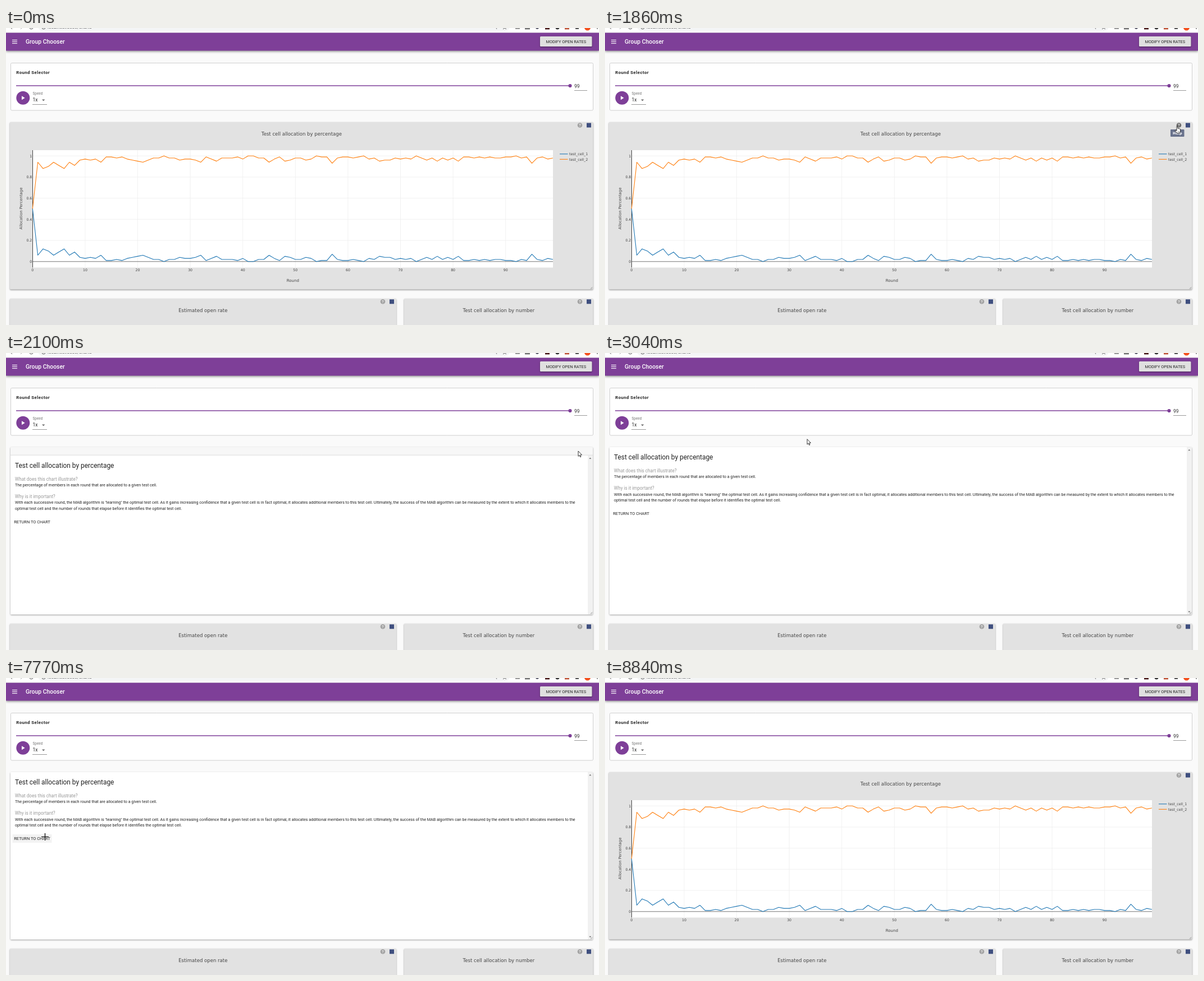
An HTML page with a canvas that plays this animation: 1056 px wide and 530 px high, repeating every 9860 ms.

```html
<!DOCTYPE html>
<html lang="en">
<head>
<meta charset="utf-8">
<title>Group Chooser</title>
<style>
html, body { margin: 0; width: 100%; height: 100%; overflow: hidden; background: #fafafa; }
canvas { display: block; }
</style>
</head>
<body>
<canvas id="stage" width="1056" height="530"></canvas>
<script>
const ctx = document.getElementById('stage').getContext('2d');
const LOOP = 9860;
const UI = 'Roboto, sans-serif';
const PLOT = '"DejaVu Sans", sans-serif';
const PURPLE = '#7e3f98';
const BLUE = '#1f77b4';
const ORANGE = '#ff7f0e';

// share of test_cell_1 per round, in percent
const share = [
  50, 6, 12, 10, 6, 9, 12, 6, 9, 4, 3, 4, 3, 6, 1, 1, 2, 1, 3, 4,
  5, 6, 4, 2, 2, 0, 2, 2, 4, 3, 3, 4, 6, 1, 3, 5, 2, 2, 2, 1,
  3, 0, 0, 2, 2, 6, 3, 1, 5, 4, 2, 2, 4, 3, 0, 1, 1, 7, 2, 1,
  1, 2, 1, 0, 3, 2, 5, 4, 4, 2, 3, 2, 3, 0, 2, 4, 2, 5, 2, 4,
  2, 5, 1, 1, 2, 1, 2, 1, 2, 2, 1, 1, 0, 2, 1, 7, 2, 1, 3, 2
];

function rect(x, y, w, h, fill) {
  ctx.fillStyle = fill;
  ctx.fillRect(x, y, w, h);
}

function text(str, x, y, size, fill, { font = UI, weight = 400, align = 'left', gap = 0 } = {}) {
  ctx.font = `${weight} ${size}px ${font}`;
  ctx.letterSpacing = gap + 'px';
  ctx.textAlign = align;
  ctx.fillStyle = fill;
  ctx.fillText(str, x, y);
}

function path(points, { fill, stroke, width = 1, close = false }) {
  ctx.beginPath();
  points.forEach(([x, y]) => ctx.lineTo(x, y));
  if (close) ctx.closePath();
  if (fill) { ctx.fillStyle = fill; ctx.fill(); }
  if (stroke) { ctx.strokeStyle = stroke; ctx.lineWidth = width; ctx.stroke(); }
}

function line(x1, y1, x2, y2, stroke, width = 1) {
  path([[x1, y1], [x2, y2]], { stroke, width });
}

function disc(x, y, r, fill) {
  ctx.beginPath();
  ctx.arc(x, y, r, 0, 7);
  ctx.fillStyle = fill;
  ctx.fill();
}

function card(x, y, w, h, fill) {
  ctx.save();
  ctx.shadowColor = 'rgba(0,0,0,.45)';
  ctx.shadowBlur = 2.5;
  ctx.shadowOffsetY = 1;
  ctx.beginPath();
  ctx.roundRect(x, y, w, h, 1.5);
  ctx.fillStyle = fill;
  ctx.fill();
  ctx.restore();
}

function browserBar() {
  rect(0, 0, 1056, 8, '#fff');
  ctx.beginPath();
  ctx.roundRect(57, -12, 840, 17, 8);
  ctx.fillStyle = '#f4f5f6';
  ctx.fill();
  text('localhost:8080/charts', 74, 1, 8, '#444');
  line(8, -1, 11, 2, '#666');
  line(29, -1, 26, 2, '#aaa');
  ctx.strokeStyle = '#666';
  ctx.lineWidth = 1;
  for (const [x, y, r] of [[45, -1, 3], [67, -1, 3]]) {
    ctx.beginPath();
    ctx.arc(x, y, r, 0, Math.PI);
    ctx.stroke();
  }
  line(873, 0, 874, 2, '#777');
  path([[885, 2], [888, 0], [891, 2]], { stroke: '#666' });
  rect(907, 0, 8, 2, '#999');
  rect(924, 0, 9, 2.5, '#777');
  disc(946, -1, 3, '#556');
  rect(960, 0, 8, 2.5, '#4a1c1c');
  disc(982, -1, 3.5, '#333');
  rect(995, 0, 8, 2.5, '#c0583c');
  rect(1014, 0, 6, 2, '#555');
  disc(1035.5, -1, 5.5, '#f4511e');
  disc(1053, 1, 0.9, '#666');
}

function appBar() {
  ctx.save();
  ctx.shadowColor = 'rgba(0,0,0,.45)';
  ctx.shadowBlur = 4;
  ctx.shadowOffsetY = 1;
  rect(0, 8.5, 1056, 32, PURPLE);
  ctx.restore();
  browserBar();
  for (const y of [21.5, 24.5, 27.5]) line(11, y, 20, y, '#fff', 1.1);
  text('Group Chooser', 35, 28, 10.4, '#fff', { weight: 500 });
  card(951, 15, 92.5, 18, '#e0e0e0');
  text('MODIFY OPEN RATES', 997.3, 26.8, 7.4, '#222', { align: 'center' });
}

function selector() {
  ctx.beginPath();
  ctx.roundRect(8.5, 62.5, 1037, 84.5, 2);
  ctx.fillStyle = '#fff';
  ctx.fill();
  ctx.strokeStyle = '#cfcfcf';
  ctx.lineWidth = 1;
  ctx.stroke();
  text('Round Selector', 18.2, 81.5, 7.8, '#222', { weight: 700, gap: 0.45 });
  line(18, 103, 1004, 103, PURPLE, 1.4);
  disc(1004.5, 103, 3.1, PURPLE);
  text('99', 1012, 106.5, 8.4, '#333');
  line(1012, 111.5, 1035, 111.5, '#999');
  disc(30.3, 124.8, 12, PURPLE);
  path([[28, 121.3], [28, 128.3], [33.6, 124.8]], { fill: '#fff', close: true });
  text('Speed', 47.5, 118.7, 6.4, '#777');
  text('1x', 47.5, 131, 8.5, '#222');
  path([[64, 127.5], [69.4, 127.5], [66.7, 130.2]], { fill: '#666', close: true });
  line(47, 136.5, 73, 136.5, '#999');
}

function icons(x, y, lit) {
  disc(x, y, 4.3, lit ? '#6e6e6e' : '#a3a3a3');
  text('?', x, y + 2.5, 7, '#eee', { weight: 700, align: 'center' });
  rect(x + 12, y - 4, 8, 8, '#3f4f7f');
}

function resizeGrip() {
  line(1041, 465.5, 1044, 462.5, '#777', 0.8);
  line(1043, 465.5, 1044, 464.5, '#777', 0.8);
}

const px = i => 47.3 + i * 9.36;
const py = v => 416.8 - v * 188.6;

function series(value, stroke) {
  path(share.map((s, i) => [px(i), py(value(s / 100))]), { stroke, width: 1.1 });
}

function chart(lit) {
  card(7, 168, 1038.5, 298.5, '#e2e2e2');
  icons(1022, 173.5, lit);
  text('Test cell allocation by percentage', 526.4, 192.3, 8.56, '#444', { font: PLOT, align: 'center' });
  rect(47, 218, 927, 209.5, '#fff');
  for (let i = 0; i < 100; i += 10) {
    if (i) line(px(i), 218, px(i), 427.5, '#eee', 0.8);
    text(i, px(i), 434, 6.2, '#444', { font: PLOT, align: 'center' });
  }
  for (let k = 0; k < 6; k++) {
    const y = py(k / 5);
    if (k) line(47, y, 974, y, '#eee', 0.8);
    text(k / 5, 46.3, y + 2.3, 6.2, '#444', { font: PLOT, align: 'right' });
  }
  line(47, py(0), 974, py(0), '#666', 0.9);
  line(47.5, 218, 47.5, 427.5, '#444');
  ctx.lineJoin = 'round';
  series(v => v, BLUE);
  series(v => 1 - v, ORANGE);
  text('Round', 510.8, 453, 7, '#444', { font: PLOT, align: 'center' });
  ctx.save();
  ctx.translate(28.5, 322);
  ctx.rotate(-Math.PI / 2);
  text('Allocation Percentage', 0, 0, 6.9, '#444', { font: PLOT, align: 'center' });
  ctx.restore();
  line(986, 224.8, 1000.5, 224.8, BLUE, 1.1);
  line(986, 234.3, 1000.5, 234.3, ORANGE, 1.1);
  text('test_cell_1', 1003, 227, 6.3, '#444', { font: PLOT });
  text('test_cell_2', 1003, 236.5, 6.3, '#444', { font: PLOT });
  resizeGrip();
}

function lowerCards() {
  const title = { font: PLOT, align: 'center' };
  card(7, 483, 688, 60, '#e2e2e2');
  icons(671, 488.3);
  text('Estimated open rate', 350.8, 507.2, 8.56, '#444', title);
  card(709, 483, 336.5, 60, '#e2e2e2');
  icons(1022, 488.3);
  text('Test cell allocation by number', 877.3, 507.2, 8.56, '#444', title);
}

function helpPanel(shift, hover) {
  card(8, 168, 1037, 298.5, shift ? '#f7f7f7' : '#fff');
  ctx.save();
  ctx.beginPath();
  ctx.rect(7, 167, 1039, 299.5);
  ctx.clip();
  ctx.translate(0, shift);
  rect(8, 168, 1028, 299, '#fff');
  rect(1036, 168, 9, 299, '#f1f1f1');
  if (shift) line(8, 167.5, 1045, 167.5, '#ddd');
  path([[1038.3, 174.2], [1042.3, 174.2], [1040.3, 171.8]], { fill: '#777', close: true });
  path([[1038.3, 460.8], [1042.3, 460.8], [1040.3, 463.2]], { fill: '#777', close: true });
  text('Test cell allocation by percentage', 16, 190.2, 11.9, '#222');
  text('What does this chart illustrate?', 16, 212.8, 8.15, '#999');
  text('The percentage of members in each round that are allocated to a given test cell.', 16, 223, 7.17, '#222');
  text('Why is it important?', 16, 244.4, 8.15, '#999');
  text('With each successive round, the MAB algorithm is "learning" the optimal test cell. As it gains increasing confidence that a given test cell is in fact optimal, it allocates additional members to this test cell. Ultimately, the success of the MAB algorithm can be measured by the extent to which it allocates members to the', 16, 254.7, 7.17, '#222');
  text('optimal test cell and the number of rounds that elapse before it identifies the optimal test cell.', 16, 264.9, 7.17, '#222');
  if (hover) rect(11.5, 279, 70, 15, '#f3f3f3');
  text('RETURN TO CHART', 14.3, 289.4, 7.4, '#222');
  ctx.restore();
  resizeGrip();
}

function tooltip() {
  ctx.beginPath();
  ctx.roundRect(1007, 181, 24.5, 13, 1);
  ctx.fillStyle = '#69728c';
  ctx.fill();
  text('Help', 1019.3, 190, 6.4, '#fff', { font: PLOT, align: 'center', weight: 700 });
}

const pointers = {
  arrow() {
    path([[0, 0], [0, 9.4], [2.1, 7.5], [3.6, 10.7], [5, 10.1], [3.6, 7], [6.4, 6.7]],
      { fill: '#fff', stroke: '#222', width: 0.9, close: true });
  },
  hand() {
    path([[-0.9, 0], [0.7, 0], [1, 4.2], [3.5, 4.6], [5.6, 5.5], [5.6, 9], [4.5, 12.6], [-0.8, 12.6],
      [-3.6, 8.6], [-3.3, 7.2], [-1, 8.4]], { fill: '#fff', stroke: '#222', width: 0.9, close: true });
    line(1.3, 9, 1.3, 11, '#555', 0.6);
    line(3, 9, 3, 11, '#555', 0.6);
  },
  cross() {
    for (const [stroke, width] of [['#fff', 2.6], ['#111', 1.4]]) {
      line(-6.5, 0, 6.5, 0, stroke, width);
      line(0, -6.5, 0, 6.5, stroke, width);
    }
  }
};

const easeInOut = u => u * u * (3 - 2 * u);
const easeOut = u => 1 - (1 - u) ** 1.6;

// each move: start, end, number of positions, curve (start, control, end), easing
const moves = [
  { from: 210, to: 1000, n: 11, curve: [[924, 518], [985, 290], [1019, 175]], ease: easeInOut },
  { from: 2570, to: 3040, n: 7, curve: [[1005, 175], [700, 172], [360, 153.7]], ease: easeInOut },
  { from: 5820, to: 6760, n: 13, curve: [[327.5, 166], [130, 300], [69.5, 283.5]], ease: easeOut },
  { from: 8080, to: 8760, n: 10, curve: [[72, 280], [300, 130], [866, 508]], ease: easeInOut }
];

function pointerAt(t) {
  const move = moves.filter(m => t >= m.from).pop();
  const last = move.n - 1;
  const step = Math.floor((t - move.from) / (move.to - move.from) * last + 0.05);
  const u = move.ease(Math.min(1, step / last));
  const [a, b, c] = move.curve;
  return [0, 1].map(k => (1 - u) ** 2 * a[k] + 2 * u * (1 - u) * b[k] + u * u * c[k]);
}

function pointerKind(t, y) {
  if (t >= 1150 && t < 2020) return 'hand';
  if (t >= 6830 && t < 7690) return 'hand';
  if (t >= 7690 && y < 427) return 'cross';
  return 'arrow';
}

function drawPointer(t) {
  if (t < 210 || t >= 8840) return;
  const [x, y] = pointerAt(t);
  ctx.save();
  ctx.translate(x, y);
  pointers[pointerKind(t, y)]();
  ctx.restore();
}

function draw(t) {
  rect(0, 0, 1056, 530, '#fafafa');
  appBar();
  selector();
  lowerCards();
  if (t >= 2020 && t < 7850) {
    helpPanel(t < 2180 ? 14.7 : 0, t >= 6680);
  } else {
    const hovered = t >= 1000 && t < 2020;
    chart(hovered);
    if (hovered) tooltip();
  }
  drawPointer(t);
}

function tick(now) {
  draw(now % LOOP);
  requestAnimationFrame(tick);
}
draw(0);
requestAnimationFrame(tick);
</script>
</body>
</html>
```
